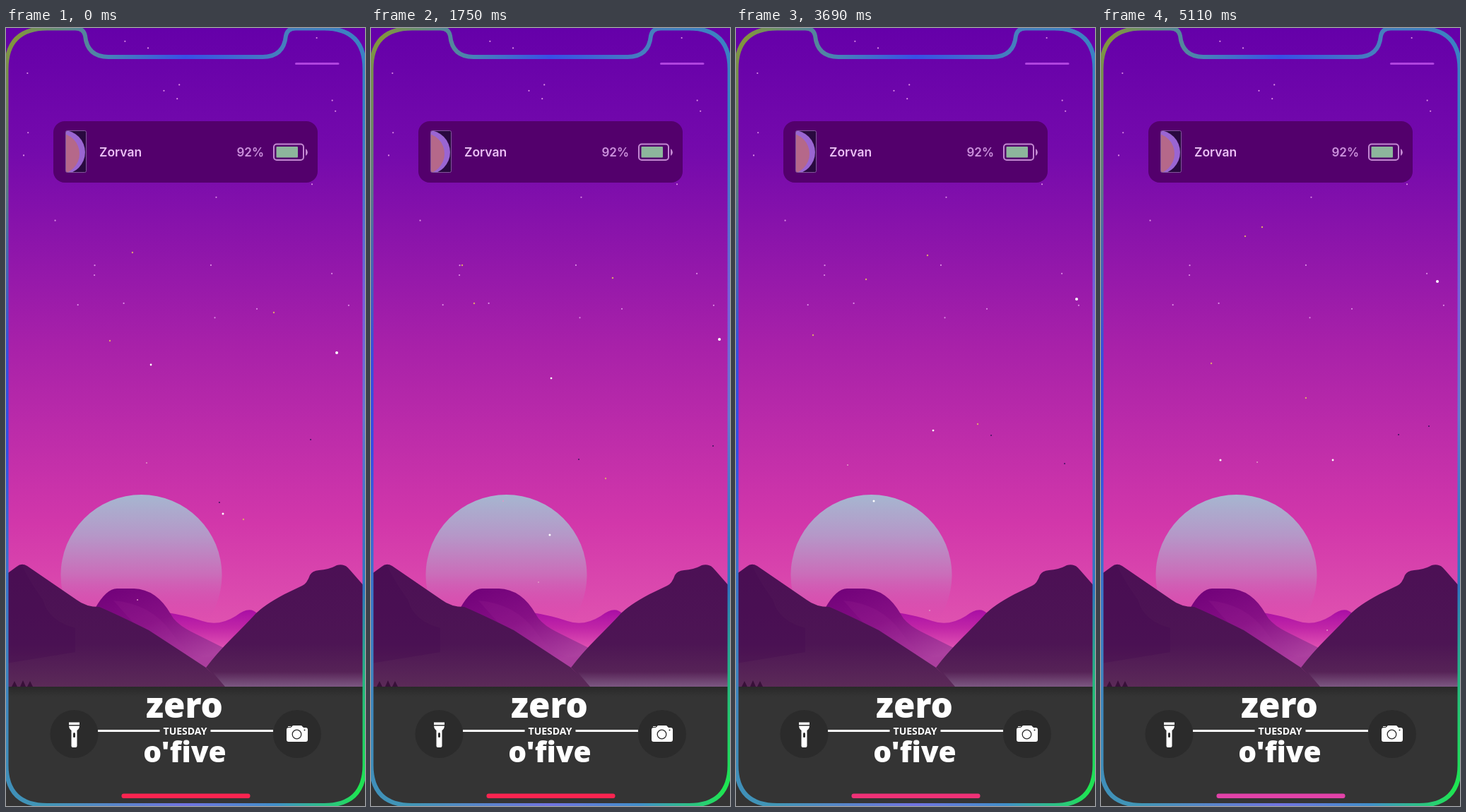
An HTML page with a canvas for the animation above (5130 ms loop, 508 by 1102 pixels).

```html
<!DOCTYPE html>
<html lang="en">
<head>
<meta charset="utf-8">
<title>Lock screen</title>
<style>
html, body { margin: 0; width: 508px; height: 1102px; overflow: hidden; background: #343434; }
svg, canvas { position: absolute; left: 0; top: 0; display: block; }
.label { font: 600 17.5px Inter, sans-serif; }
.clock { font-family: "Open Sans", sans-serif; font-weight: 800; fill: #fff; text-anchor: middle; }
</style>
</head>
<body>
<svg width="508" height="1102" viewBox="0 0 508 1102">
  <defs>
    <linearGradient id="sky" gradientUnits="userSpaceOnUse" x1="0" y1="0" x2="0" y2="900">
      <stop offset="0" stop-color="#6500a9"/><stop offset=".2" stop-color="#750aac"/>
      <stop offset=".5" stop-color="#a821a9"/><stop offset=".78" stop-color="#d237aa"/>
      <stop offset="1" stop-color="#e45cb2"/>
    </linearGradient>
    <linearGradient id="moon" x1="0" y1="0" x2="0" y2="1">
      <stop offset="0" stop-color="#a6b6d0"/><stop offset=".25" stop-color="#b598c8"/>
      <stop offset=".5" stop-color="#cb6cb9"/><stop offset=".8" stop-color="#da45ac" stop-opacity="0"/>
    </linearGradient>
    <linearGradient id="far" x1="0" y1="0" x2="0" y2="1">
      <stop offset="0" stop-color="#a90ea5"/><stop offset=".3" stop-color="#c126a7"/>
      <stop offset=".65" stop-color="#e354b4"/>
    </linearGradient>
    <linearGradient id="mid" x1="0" y1="0" x2=".6" y2="1">
      <stop offset="0" stop-color="#700079"/><stop offset=".5" stop-color="#861085"/>
      <stop offset="1" stop-color="#ac409f"/>
    </linearGradient>
    <linearGradient id="near" gradientUnits="userSpaceOnUse" x1="0" y1="760" x2="0" y2="933">
      <stop offset="0" stop-color="#4c1055"/><stop offset=".65" stop-color="#4d1554"/>
      <stop offset="1" stop-color="#5b2a58"/>
    </linearGradient>
    <linearGradient id="haze" x1="0" y1="0" x2="0" y2="1">
      <stop offset="0" stop-color="#8a6a94" stop-opacity="0"/><stop offset="1" stop-color="#8a6a94" stop-opacity=".7"/>
    </linearGradient>
    <linearGradient id="edge" x1="0" y1="0" x2="0" y2="1">
      <stop offset="0" stop-color="#292929"/><stop offset="1" stop-color="#343434"/>
    </linearGradient>
    <clipPath id="screen"><rect x="85" y="146" width="28" height="58" rx="1"/></clipPath>
  </defs>

  <rect width="508" height="940" fill="url(#sky)"/>
  <g id="stars" fill="#dc8ce4"></g>
  <circle cx="191.5" cy="775" r="114" fill="url(#moon)"/>

  <path fill="url(#far)" d="M228 828Q255 832 278 840T325 833Q345 817 356 830L350 910H270Z"/>
  <path fill="url(#mid)" d="M126 822Q142 794 157 794H181Q213 795 233 830Q240 844 262 855T308 878L283 908Z"/>
  <path fill="#a63299" opacity=".15" d="M152 811Q205 815 235 857T296 890L283 908L200 865Z"/>
  <path fill="url(#near)" d="M0 774L15 763Q22 757 30 762L100 810Q113 820 132 820Q160 832 202 853L283 906L310 933H0Z"/>
  <path fill="#430850" opacity=".3" d="M0 774L22 760Q34 786 52 810Q60 840 98 850V884L0 900Z"/>
  <path fill="url(#near)" d="M283 906Q298 886 319 865T352 831T394 802L419 790Q426 787 430 775Q433 769 443 768Q458 767 468 761Q480 758 487 768L508 792V933H308Z"/>
  <path fill="url(#haze)" d="M292 912H508V933H310Z"/>
  <path fill="#381039" d="M8 933l4-8 4 8zM20 933l4-9 4 9zM30 933l4-8 4 8z"/>

  <rect y="933" width="508" height="169" fill="#343434"/>
  <rect y="933" width="508" height="14" fill="url(#edge)"/>

  <rect x="409" y="49" width="62.5" height="3" rx="1.5" fill="#b044df"/>
  <rect x="67" y="132" width="374" height="87" rx="16" fill="#53006c"/>
  <g clip-path="url(#screen)">
    <rect x="84" y="145" width="30" height="60" fill="#29093f"/>
    <circle cx="81" cy="176" r="31" fill="#9a65d2"/>
    <circle cx="75" cy="178" r="29" fill="#b5688a"/>
  </g>
  <rect x="84.5" y="145.5" width="29" height="59" rx="2" fill="none" stroke="#81589b"/>
  <text class="label" x="132" y="182" fill="#ebbff5">Zorvan</text>
  <text class="label" x="365" y="182" fill="#cc91dc" text-anchor="end" style="font-size:17px">92%</text>
  <rect x="379" y="164.5" width="42" height="22.5" rx="4" fill="none" stroke="#c489d2" stroke-width="2"/>
  <rect x="382.5" y="168" width="30.5" height="15.5" rx="1" fill="#8db69c"/>
  <path fill="#c489d2" d="M424 171Q427 173 427 176T424 181Z"/>

  <g fill="#2b2b2b"><circle cx="96.5" cy="1000" r="34"/><circle cx="412" cy="1000" r="34"/></g>
  <g fill="#fff">
    <path d="M89 983.5H104V987H89ZM89 988.5H104Q103.5 993 100.5 995V1017Q100.5 1019 98.5 1019H94.5Q92.5 1019 92.5 1017V995Q89.5 993 89 988.5Z"/>
    <path d="M403 991L406 988H418L421 991Z"/>
    <rect x="397" y="991" width="30" height="20" rx="3"/>
    <path d="M399 989h4v1h-4zM130 994h87.5v3H130zM289.5 994H378v3h-88.5z"/>
  </g>
  <rect x="95" y="998" width="3" height="7" rx="1.5" fill="#2b2b2b"/>
  <circle cx="411.5" cy="1000.5" r="6.3" fill="none" stroke="#2b2b2b" stroke-width="1.3"/>
  <circle cx="422.5" cy="994.5" r="1" fill="#2b2b2b"/>
  <g class="clock">
    <text x="252.5" y="977" font-size="49.3">zero</text>
    <text x="253.5" y="1001" font-size="14" style="font-weight:700">TUESDAY</text>
    <text x="253" y="1040" font-size="40.7">o'five</text>
  </g>
  <rect id="bar" x="163.5" y="1084.5" width="182" height="6.5" rx="3"/>
</svg>
<canvas width="508" height="1102"></canvas>

<script>
const LOOP = 5130;
const KEYS = [0, 1750, 3690, 5110];
const ctx = document.querySelector('canvas').getContext('2d');
const bar = document.getElementById('bar');

// Fixed stars, denser towards the top
let seed = 11;
const random = () => (seed = seed * 16807 % 2147483647) / 2147483647;
document.getElementById('stars').innerHTML = Array.from({ length: 26 }, () =>
  `<circle cx="${25 + 460 * random()}" cy="${12 + 520 * random() ** 1.4}" r="1.1"/>`).join('');

// Drifting specks: radius, colour, then one point per entry of KEYS
const WHITE = '#fff', GOLD = '#dca26d', DARK = '#3d125f', PINK = '#e097c6';
const motes = [
  [2, WHITE, [468, 460], [493, 441], [482, 384], [476, 359]],
  [1.4, WHITE, [205, 477], [255, 496], [279, 570], [328, 612]],
  [1.5, WHITE, [307, 688], [253, 718], [195, 670], [169, 612]],
  [1.2, GOLD, [336, 696], [332, 638], [342, 561], [290, 524]],
  [1.2, GOLD, [179, 318], [129, 336], [184, 356], [204, 295]],
  [1.2, GOLD, [147, 443], [146, 390], [109, 435], [156, 475]],
  [1.2, GOLD, [379, 403], [342, 354], [271, 322], [228, 282]],
  [1, DARK, [302, 672], [294, 611], [361, 577], [421, 576]],
  [1, DARK, [431, 583], [484, 592], [465, 617], [464, 564]],
  [1, PINK, [199, 616], [187, 670], [158, 619], [221, 615]],
  [1, PINK, [186, 810], [237, 785], [274, 825], [320, 853]],
];

// Weight of each key point on the cubic curve through all four
const weights = t => KEYS.map(a =>
  KEYS.reduce((w, b) => a === b ? w : w * (t - b) / (a - b), 1));

const outline = new Path2D('M58 .5H98Q110 .5 112 11Q115 41 145 41H363Q393 41 396 11Q398 .5 410 .5H450'
  + 'Q507.5 .5 507.5 58V1044Q507.5 1101 450 1101H58Q.5 1101 .5 1044V58Q.5 .5 58 .5Z');
const rim = ctx.createConicGradient(-Math.PI / 2, 254, 551);
Object.entries({
  0: '#3850e6', 15: '#4680bd', 30: '#3582c5', 56: '#785fdc', 90: '#6578d2', 134: '#2d75c0',
  155: '#1ee650', 167: '#418fca', 180: '#7173e1', 200: '#4196b5', 259: '#304de6',
  290: '#344fde', 315: '#476da9', 336: '#82963c', 348: '#4682b9', 360: '#3850e6',
}).forEach(([deg, color]) => rim.addColorStop(deg / 360, color));

function draw(t) {
  const p = Math.min(Math.max((t - 1750) / 3360, 0), 1) ** 1.5;
  bar.setAttribute('fill', `rgb(${250 - 24 * p},${36 + 30 * p},${80 + 88 * p})`);
  ctx.clearRect(0, 0, 508, 1102);
  const w = weights(t);
  for (const [r, color, ...points] of motes) {
    const [x, y] = [0, 1].map(axis => points.reduce((sum, pt, i) => sum + w[i] * pt[axis], 0));
    ctx.fillStyle = color;
    ctx.beginPath();
    ctx.arc(x, y, r, 0, 7);
    ctx.fill();
  }
  ctx.strokeStyle = rim;
  ctx.lineWidth = 6;
  ctx.stroke(outline);
}

const start = performance.now();
function tick() {
  draw((performance.now() - start) % LOOP);
  requestAnimationFrame(tick);
}
tick();
</script>
</body>
</html>
```
